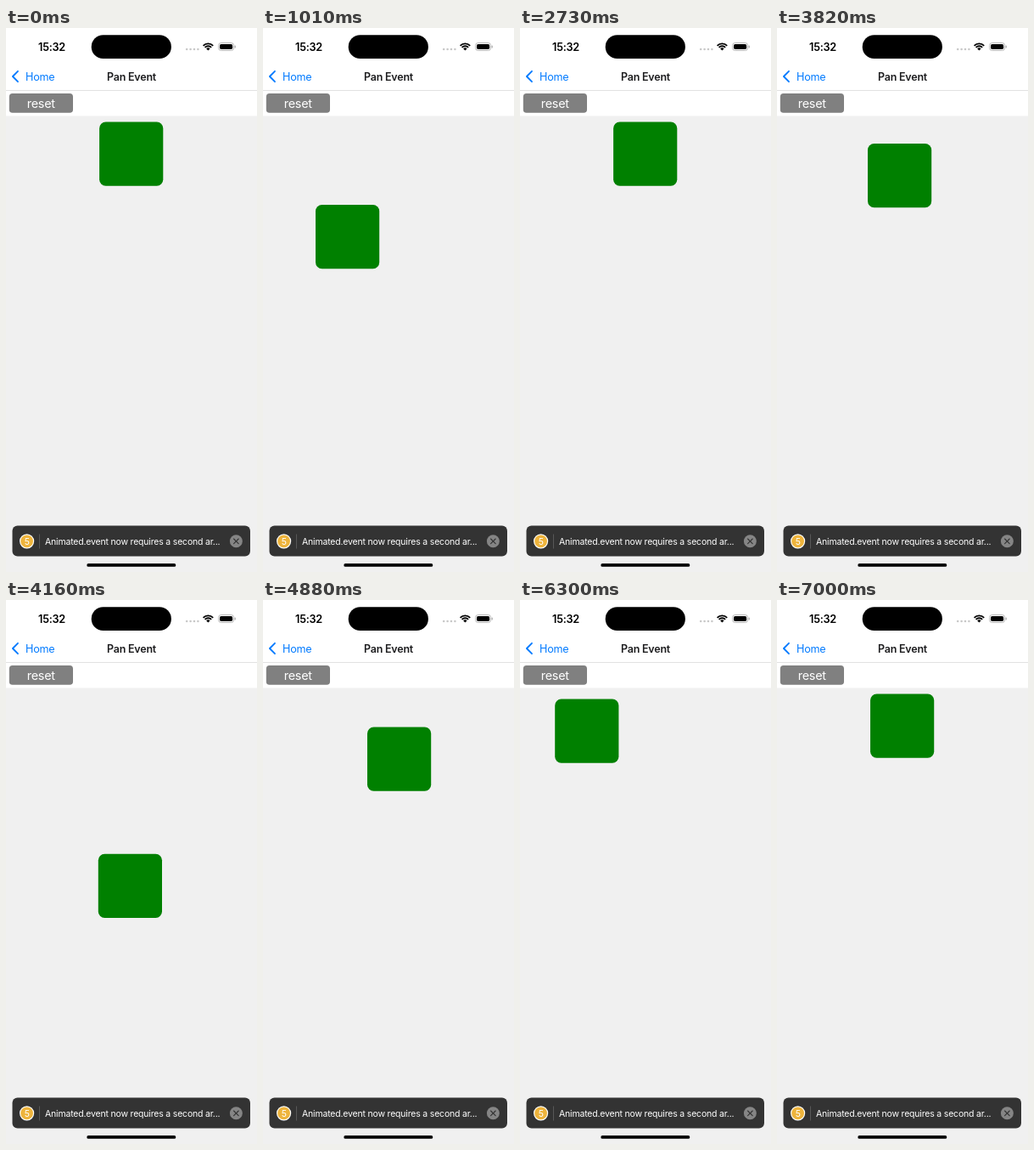
Recreate the animation shown at these times as an HTML page with a canvas. Size 296 by 640 pixels, loop 7970 ms.

```html
<!DOCTYPE html>
<html lang="en">
<head>
<meta charset="utf-8">
<title>Pan Event</title>
<style>
  html, body { margin: 0; width: 100%; height: 100%; overflow: hidden; background: #fff; }
  canvas { display: block; width: 296px; height: 640px; }
</style>
</head>
<body>
<canvas id="stage"></canvas>
<script>
const W = 296, H = 640, LOOP = 7970;
const HOME = [110.1, 110.6], SIZE = 75.2;
const canvas = document.getElementById('stage');
const ctx = canvas.getContext('2d');
const ratio = window.devicePixelRatio || 1;
canvas.width = W * ratio;
canvas.height = H * ratio;
ctx.scale(ratio, ratio);

// Each gesture: finger positions [time, x, y], then a spring home,
// sampled at the listed screen refreshes [first, last, count].
const gestures = [
  {
    moves: [[1010, 62, 208], [1130, 0, 303.5], [1390, -1, 312.5], [1500, 12, 299], [1620, 34.3, 272.2]],
    release: 1914, ticks: [[1930, 2730, 9]]
  },
  {
    moves: [[3820, 107, 136], [3930, 98.3, 212], [4050, 99, 275], [4160, 108.8, 298.8],
            [4270, 143, 294], [4380, 170, 272], [4490, 156.8, 251.6]],
    release: 4746, ticks: [[4760, 4760, 1], [4880, 5520, 7]]
  },
  {
    moves: [[5640, ...HOME], [5750, 96, 113], [5860, 67, 117.4], [5980, 46.3, 116.8], [6300, 41.2, 116.5]],
    release: 6335, ticks: [[6400, 7000, 7]]
  }
];

// Remaining share of the distance for a damped spring (stiffness 230.2, damping 22).
function springRest(ms) {
  const s = Math.max(0, ms) / 1000, decay = 11;
  const freq = Math.sqrt(230.2 - decay * decay);
  return Math.exp(-decay * s) * (Math.cos(freq * s) + decay / freq * Math.sin(freq * s));
}

function lastTick(ticks, t) {
  let found = null;
  for (const [first, last, count] of ticks) {
    if (t < first) break;
    const gap = count > 1 ? (last - first) / (count - 1) : 1;
    found = first + Math.min(count - 1, Math.floor((t - first) / gap + 1e-6)) * gap;
  }
  return found;
}

function positionAt(t) {
  const gesture = gestures.filter(g => t >= g.moves[0][0]).pop();
  if (!gesture) return HOME;
  const [, x, y] = gesture.moves.filter(m => t >= m[0]).pop();
  const tick = lastTick(gesture.ticks, t);
  if (tick === null) return [x, y];
  const rest = springRest(tick - gesture.release);
  return [HOME[0] + (x - HOME[0]) * rest, HOME[1] + (y - HOME[1]) * rest];
}

function box(x, y, w, h, r, color) {
  ctx.fillStyle = color;
  ctx.beginPath();
  ctx.roundRect(x, y, w, h, r);
  ctx.fill();
}

function disc(x, y, r, color) {
  ctx.fillStyle = color;
  ctx.beginPath();
  ctx.arc(x, y, r, 0, Math.PI * 2);
  ctx.fill();
}

function line(points, width, color, cap = 'butt') {
  ctx.strokeStyle = color;
  ctx.lineWidth = width;
  ctx.lineCap = cap;
  ctx.lineJoin = 'round';
  ctx.beginPath();
  points.forEach(([x, y]) => ctx.lineTo(x, y));
  ctx.stroke();
}

function text(str, x, y, size, color, { weight = 400, align = 'left' } = {}) {
  ctx.font = `${weight} ${size}px Inter, Roboto, sans-serif`;
  ctx.letterSpacing = `${-0.018 * size}px`;
  ctx.textAlign = align;
  ctx.fillStyle = color;
  ctx.fillText(str, x, y);
}

function drawWifi(x, y) {
  const from = -Math.PI * 0.75, to = -Math.PI * 0.25;
  ctx.strokeStyle = '#000';
  ctx.lineCap = 'butt';
  ctx.lineWidth = 1.9;
  for (const r of [8.2, 5.3]) {
    ctx.beginPath();
    ctx.arc(x, y, r, from, to);
    ctx.stroke();
  }
  ctx.fillStyle = '#000';
  ctx.beginPath();
  ctx.moveTo(x, y);
  ctx.arc(x, y, 3.2, from, to);
  ctx.fill();
}

function drawStatusBar() {
  text('15:32', 54, 26.5, 12.7, '#000', { weight: 600, align: 'center' });
  box(100.7, 8.3, 94.2, 27.8, 13.9, '#000');
  for (let i = 0; i < 4; i++) disc(213.2 + i * 4.4, 25, 1.3, '#c8c8c8');
  drawWifi(238.4, 26.6);
  ctx.strokeStyle = '#a8a8a8';
  ctx.lineWidth = 0.8;
  ctx.beginPath();
  ctx.roundRect(250.6, 17.5, 18, 9, 3);
  ctx.stroke();
  box(252, 18.9, 15.2, 6.2, 1.8, '#000');
  box(269.6, 20.5, 1.2, 3, 0.6, '#a8a8a8');
}

function drawHeader() {
  line([[14, 50.8], [7.9, 57], [14, 63.2]], 1.8, '#007aff', 'round');
  text('Home', 23, 61.6, 12.6, '#007aff');
  text('Pan Event', 148, 61.6, 12.5, '#1c1c1e', { weight: 600, align: 'center' });
  box(0, 73, W, 0.8, 0, '#d8d8d8');
  box(3.8, 77, 75.2, 22.8, 3.8, '#808080');
  text('reset', 41.3, 94, 14.4, '#fff', { align: 'center' });
}

function drawToast() {
  box(7.5, 585.5, 280.5, 36, 6, '#333');
  disc(24.6, 603.8, 8.6, '#fff');
  disc(24.6, 603.8, 7.4, '#eeb43c');
  text('5', 24.7, 607.6, 10.5, '#fff', { align: 'center' });
  box(39, 595.5, 0.9, 17, 0, '#5c5c5c');
  text('Animated.event now requires a second ar...', 46, 607.6, 10.5, '#fff');
  disc(271.4, 603.8, 7.5, '#858585');
  line([[268.6, 601], [274.2, 606.6]], 1.1, '#333', 'round');
  line([[274.2, 601], [268.6, 606.6]], 1.1, '#333', 'round');
}

function render(now) {
  const [x, y] = positionAt(now % LOOP);
  box(0, 0, W, H, 0, '#fff');
  drawStatusBar();
  drawHeader();
  box(0, 103.5, W, H - 103.5, 0, '#f0f0f0');
  box(x, y, SIZE, SIZE, 7.5, '#008000');
  drawToast();
  box(95.3, 630, 105, 3.8, 1.9, '#000');
}

const started = performance.now();
function frame() {
  render(performance.now() - started);
  requestAnimationFrame(frame);
}
frame();
</script>
</body>
</html>
```
